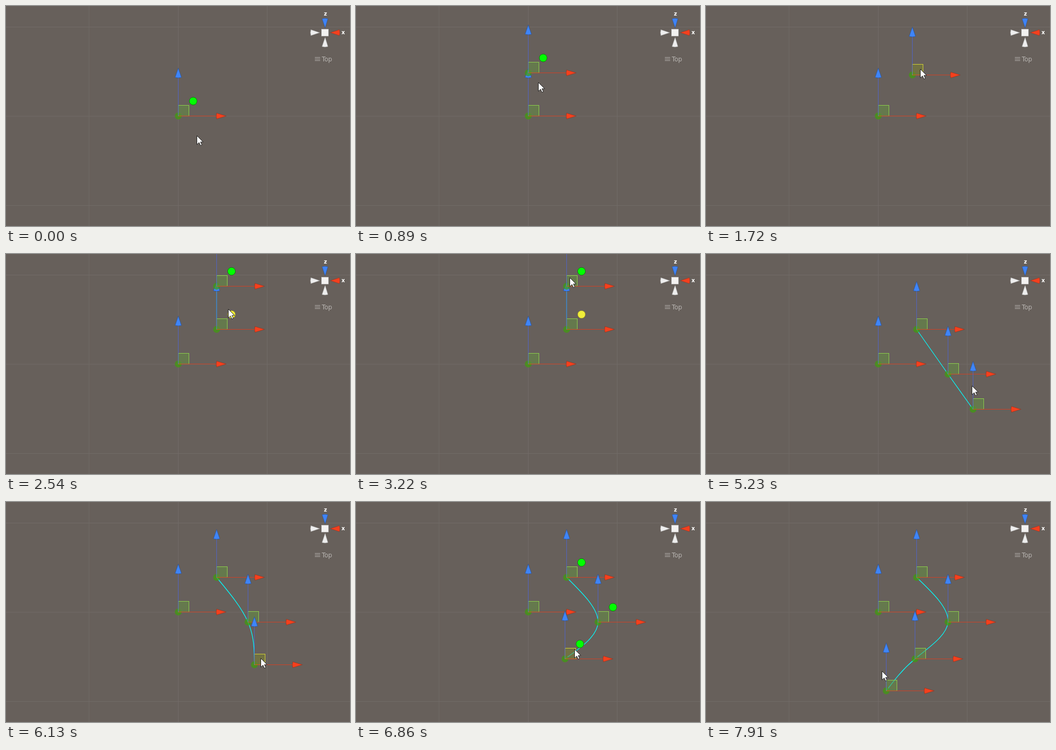
Write an HTML page that moves like this. It is 646 px wide and 413 px high and loops after 7990 ms.

```html
<!DOCTYPE html>
<html lang="en">
<head>
<meta charset="utf-8">
<title>Path handles</title>
<style>
  html, body { margin: 0; width: 100%; height: 100%; overflow: hidden; background: #67605b; }
  svg { display: block; width: 646px; height: 413px; }
  text { font-family: "DejaVu Sans", sans-serif; fill: #fff; }
</style>
</head>
<body>
<svg viewBox="0 0 646 413">
  <path d="M156 0V413M323.5 0V413M490.5 0V413M0 39.5H646M0 207H646M0 374.5H646" stroke="#716b67"/>
  <g id="scene"></g>
  <g stroke-width=".6">
    <path d="M593.5 24Q599 22 604.5 24L599.3 41Z" fill="#3f83f5" stroke="#294f94"/>
    <path d="M626 44.5Q628 50 626 55.5L609 50Z" fill="#f2401f" stroke="#8d3422"/>
    <path d="M572.5 44.5Q571 50 572.5 55.5L589 50Z" fill="#eee" stroke="#aaa"/>
    <path d="M593.5 76Q599 78 604.5 76L599.3 59Z" fill="#eee" stroke="#aaa"/>
    <rect x="592.5" y="43.5" width="13" height="13" fill="#f3f2f1" stroke="#bbb"/>
  </g>
  <text x="597" y="18" font-size="10" font-weight="bold">z</text>
  <text x="630" y="53" font-size="10" font-weight="bold">x</text>
  <path d="M580 96.5H590M580 99.5H590M580 102.5H590" stroke="#b4b0ad"/>
  <text x="593" y="104" font-size="11.5" style="fill:#b9b6b3">Top</text>
  <path id="cursor" d="M-.5 .5V17L3.6 13.2L6.2 19L8.8 17.8L6.3 12.2H11.2Z" fill="#fff" stroke="#222"/>
</svg>
<script>
const LOOP = 7990, TICK = 73;
const ORIGIN = [323, 206], POINTER = [359, 243];
const LEG = 81;          // distance from a point to the one it spawns
const BALL = [28, -28];  // spawn button, relative to its handle

// Each round: balls appear, pointer hovers one, a click spawns a point,
// the pointer reaches it and drags it through [start, end, x, y] moves.
const rounds = [
  { balls: [0, 1360], hover: [140, 300], click: 590, reach: [750, 1130], grip: [16, -11],
    drag: [[1360, 1580, 387, 129], [1790, 1860, 395, 141]] },
  { balls: [2090, 3520], hover: [2090, 2390], click: 2540, reach: [2540, 3360], grip: [6, -18],
    drag: [[3520, 4180, 454, 225]] },
  { balls: [4410, 5150], hover: [4410, 4830], click: 4990, reach: [4990, 5750], grip: [13, -12],
    drag: [[6130, 6130, 466, 305], [6200, 6490, 392, 294]] },
  { balls: [6800, 7550], hover: [6800, 7020], click: 7310, reach: [7310, 7910], grip: [-7, -37],
    drag: [] }
];

const scene = document.getElementById('scene');
const cursorEl = document.getElementById('cursor');
const add = (p, q) => [p[0] + q[0], p[1] + q[1]];

// Eased move that advances once per tick, its first step at the start time.
function glide(from, to, t, [start, end]) {
  if (t < start) return from;
  const steps = Math.round((end - start) / TICK) + 1;
  const step = steps > 1 ? Math.floor((t - start) / (end - start) * (steps - 1)) + 1 : 1;
  const p = Math.min(1, step / steps);
  return from.map((v, k) => Math.round(v + (to[k] - v) * p * (2 - p)));
}

// A new point continues the last leg; the first legs go straight up.
function spawnFrom(spots) {
  const last = spots.at(-1);
  if (spots.length < 3) return add(last, [0, -LEG]);
  const [dx, dy] = last.map((v, k) => v - spots.at(-2)[k]);
  const scale = LEG / Math.hypot(dx, dy);
  return add(last, [dx * scale, dy * scale]).map(Math.round);
}

function stateAt(t) {
  const spots = [ORIGIN];
  let cursor = POINTER;
  for (const { hover, click, reach, grip, drag } of rounds) {
    cursor = glide(cursor, add(add(spots.at(-1), BALL), [-2, 2]), t, hover);
    if (t < click) break;
    let spot = spawnFrom(spots);
    cursor = glide(cursor, add(spot, grip), t, reach);
    for (const [start, end, x, y] of drag) {
      spot = glide(spot, [x, y], t, [start, end]);
      if (t >= start) cursor = add(spot, grip);
    }
    spots.push(spot);
  }
  return { spots, cursor };
}

function drawHandle([x, y], grabbed) {
  const edge = grabbed ? '#cfcf35' : '#8ccc4c';
  const fill = grabbed ? 'rgba(125,130,45,.5)' : 'rgba(100,145,65,.5)';
  return `<g transform="translate(${x + .5} ${y + .5})">
    <circle r="6.5" fill="rgba(62,160,10,.7)"/>
    <rect y="-20" width="20" height="20" fill="${fill}" stroke="${edge}"/>
    <path d="M0 0V-72" stroke="rgba(75,100,220,.8)"/>
    <path d="M0 0H72" stroke="rgba(222,62,30,.85)"/>
    <path d="M-6 -72.5Q0 -70.5 6 -72.5L0 -90Z" fill="#3f85f7" stroke="#284f96" stroke-width=".7"/>
    <path d="M72 -5.5Q70.5 0 72 5.5L90 0Z" fill="#f5401d" stroke="#8d3422" stroke-width=".7"/>
  </g>`;
}

function drawBall(spot, hovered) {
  const [x, y] = add(spot, BALL);
  const [fill, rim] = hovered ? ['#f1ee3a', '#8b8530'] : ['#00ff00', '#176b12'];
  return `<circle cx="${x + .5}" cy="${y + .5}" r="7.3" fill="${fill}" stroke="${rim}" stroke-width=".9"/>`;
}

// Natural cubic spline: tangents are found by relaxation, segments drawn as Béziers.
function drawCurve(p) {
  const end = p.length - 1;
  if (end < 1) return '';
  const m = p.map(() => [0, 0]);
  for (let pass = 0; pass < 20; pass++) {
    for (let i = 0; i <= end; i++) {
      const a = Math.max(0, i - 1), b = Math.min(end, i + 1);
      for (const k of [0, 1]) {
        const around = (a < i ? m[a][k] : 0) + (b > i ? m[b][k] : 0);
        m[i][k] = (3 * (p[b][k] - p[a][k]) - around) / (2 * (b - a));
      }
    }
  }
  let d = `M${p[0]}`;
  for (let i = 0; i < end; i++) {
    const c1 = p[i].map((v, k) => v + m[i][k] / 3);
    const c2 = p[i + 1].map((v, k) => v - m[i + 1][k] / 3);
    d += `C${c1} ${c2} ${p[i + 1]}`;
  }
  return `<path d="${d}" transform="translate(.5 .5)" fill="none" stroke="#00ffff" stroke-width="1.2"/>`;
}

function render(t) {
  const { spots, cursor } = stateAt(t);
  const newest = spots.length - 1;
  const grabbed = rounds[newest - 1]?.drag[0]?.[0] <= t;
  const current = rounds.findIndex(({ balls }) => t >= balls[0] && t < balls[1]);

  let markup = drawCurve(spots.slice(1));
  spots.forEach((spot, i) => { markup += drawHandle(spot, grabbed && i === newest); });
  if (current >= 0) {
    spots.forEach((spot, i) => {
      if (i === 0 && newest > 0) return;
      markup += drawBall(spot, i === current && t >= rounds[current].hover[1]);
    });
  }
  scene.innerHTML = markup;
  cursorEl.setAttribute('transform', `translate(${cursor})`);
}

const begin = performance.now();
function tick() {
  render((performance.now() - begin) % LOOP);
  requestAnimationFrame(tick);
}
tick();
</script>
</body>
</html>
```
